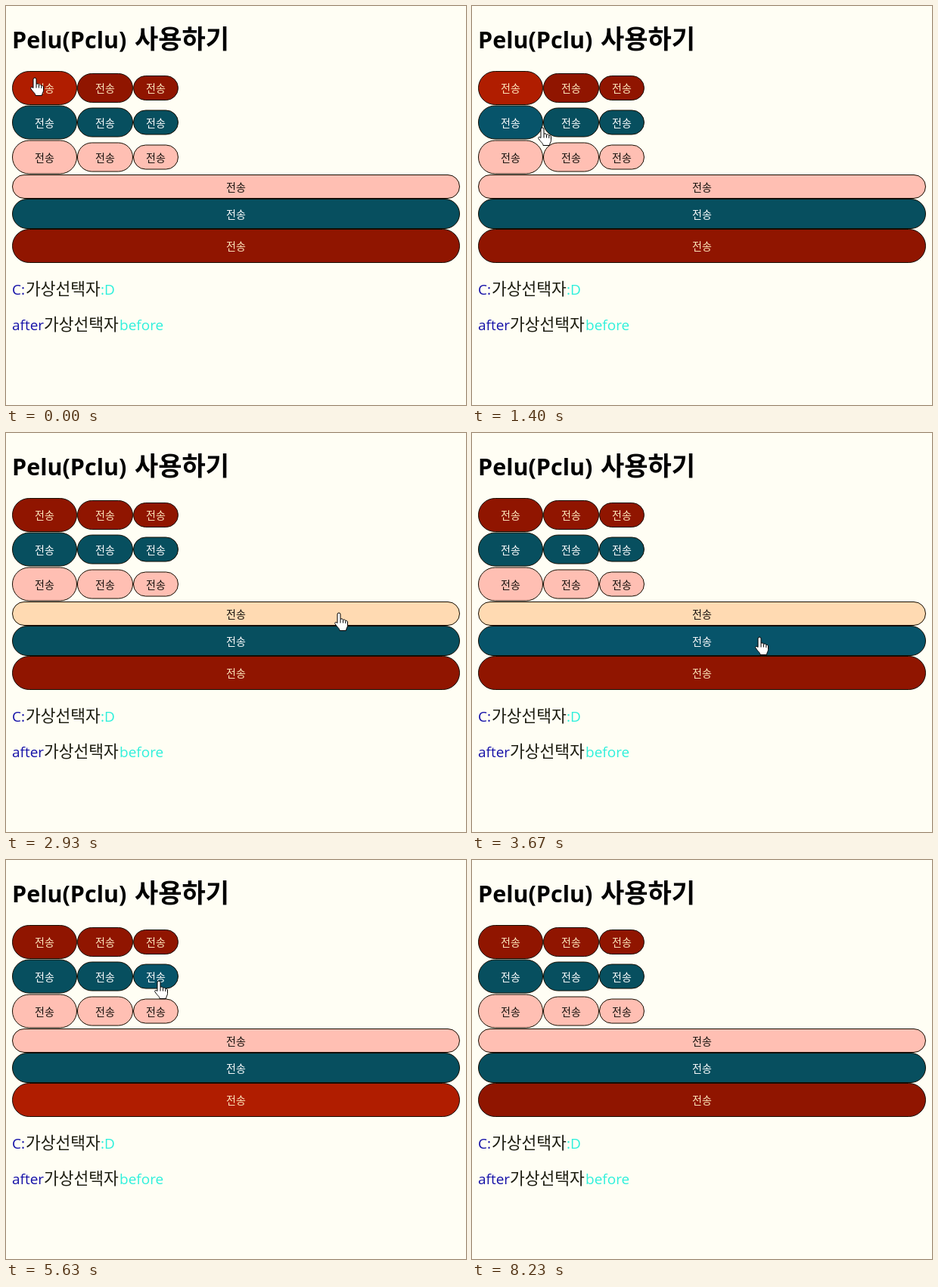
An HTML page that plays this animation: 608 by 528 pixels, repeating every 8.83 s.

```html
<!DOCTYPE html>
<html lang="ko">
<head>
<meta charset="utf-8">
<style>
  html, body { margin: 0; width: 100%; height: 100%; overflow: hidden; background: #fffef4; }
  svg { display: block; width: 608px; height: 528px; }
  text { font-family: "Open Sans", "Noto Sans CJK KR", "Noto Sans CJK", sans-serif; }
  .label { font-size: 14px; text-anchor: middle; }
  .title { font-weight: 700; fill: #000; }
  .latin { font-size: 19px; }
  .hangul { font-size: 21.5px; fill: #1c1c10; }
  .pre { fill: #1410a8; }
  .post { fill: #2ff0dc; }
</style>
</head>
<body>
<svg viewBox="0 0 608 528">
  <rect width="608" height="528" fill="#fffef4"/>
  <text class="title" x="8" y="56" font-size="30.5">Pelu(Pclu)</text>
  <text class="title" x="170" y="56" font-size="34">사용하기</text>
  <g id="buttons"></g>
  <text class="latin pre" x="8" y="382">C:</text>
  <text class="hangul" x="26" y="382">가상선택자</text>
  <text class="latin post" x="125" y="382">:D</text>
  <text class="latin pre" x="8" y="429">after</text>
  <text class="hangul" x="50" y="429">가상선택자</text>
  <text class="latin post" x="150" y="429">before</text>

  <g id="dialog">
    <rect x="78" y="-30" width="452" height="158" rx="3" fill="#000" opacity=".22"/>
    <rect x="80" y="-30" width="448" height="156" rx="2" fill="#2b2911"/>
    <text x="96" y="28" font-size="15.5" fill="#f4f4ea">localhost:3000 내용:</text>
    <text x="96" y="56" font-size="14" fill="#f0f0e2">버튼이 클릭되었습니다.</text>
    <rect x="448" y="78" width="64" height="31" rx="4" fill="#8fb3dc" stroke="#4a7cc0" stroke-width="2"/>
    <rect x="450" y="80" width="60" height="27" rx="3" fill="none" stroke="#1d2a3c"/>
    <text class="label" x="480" y="98" font-size="13" fill="#1c2838">확인</text>
  </g>

  <g id="cursor" fill="#fff" stroke="#000" stroke-linejoin="round">
    <path id="arrow" d="M0 0V16L4 12.5L6.6 19L9.5 17.8L6.8 11.6H12Z"/>
    <path id="hand" transform="translate(-6 -.5)" d="M4 14V2.5a2 2 0 0 1 4 0V9a2 2 0 0 1 3.5 1a2 2 0 0 1 3.3 1a1.8 1.8 0 0 1 2.7 1.5V17c0 3-2 4-2 7H7c0-3-3-4-6-9c-1-2 1-3 3-1zM8 9v5M11.5 10v4M14.8 11v3.5"/>
  </g>
</svg>
<script>
const LOOP = 8830;
const byId = id => document.getElementById(id);

const themes = {
  red:  { base: '#901500', lit: '#b01d00', pressed: '#8c1000', ink: '#ffe9bd' },
  teal: { base: '#074f5f', lit: '#07546a', pressed: '#07546a', ink: '#ffffff' },
  pink: { base: '#ffbfb3', lit: '#ffdab2', pressed: '#ffbfb3', ink: '#15100c' }
};

function addNode(parent, tag, attrs) {
  const node = document.createElementNS('http://www.w3.org/2000/svg', tag);
  for (const key in attrs) node.setAttribute(key, attrs[key]);
  return parent.appendChild(node);
}

function makeButton(theme, x, w, middle, h) {
  const y = middle - h / 2;
  const shape = addNode(byId('buttons'), 'rect', {
    x: x + .5, y: y + .5, width: w - 1, height: h - 1, rx: (h - 1) / 2, stroke: '#140c00'
  });
  const label = addNode(byId('buttons'), 'text', {
    class: 'label', x: x + w / 2, y: middle + 5.5, fill: themes[theme].ink
  });
  label.textContent = '전송';
  return { theme, x, y, w, h, shape };
}

const rows = [['red', 108.5], ['teal', 154], ['pink', 200]];
const sizes = [[8, 86, 45], [94, 74, 39], [168, 60, 33]];
const buttons = rows.flatMap(([theme, middle]) =>
  sizes.map(([x, w, h]) => makeButton(theme, x, w, middle, h)));
const wide = {
  pink: makeButton('pink', 8, 592, 239, 32),
  teal: makeButton('teal', 8, 592, 275, 40),
  red: makeButton('red', 8, 592, 317.5, 45)
};
buttons.push(...Object.values(wide));

// Each dialog: opening time, closing time, button that opened it.
const dialogs = [
  [250, 1050, buttons[0]],
  [1650, 2450, null],
  [2950, 3420, wide.pink],
  [4600, 5220, wide.red]
];
const focusSpans = [
  [150, 2880, buttons[0]],
  [2880, 4520, wide.pink],
  [4520, 6000, wide.red]
];

// Pointer tip: time, x, y.
const path = [
  [0, 38, 95], [220, 40, 97], [700, 488, 95], [1060, 490, 97],
  [1400, 93, 161], [1500, 84, 154], [1620, 84, 154], [2050, 500, 97],
  [2370, 511, 100], [2460, 511, 100], [2820, 440, 236], [2960, 440, 238],
  [3250, 485, 95], [3430, 485, 97], [3670, 380, 270], [4050, 384, 290],
  [4400, 405, 315], [4570, 410, 312], [4670, 439, 250], [4900, 483, 96],
  [5230, 485, 98], [5630, 202, 160], [6000, 198, 108], [6300, 190, 104],
  [6650, 133, 104], [6900, 140, 150], [7200, 196, 190], [7650, 196, 190],
  [8100, 468, 206], [8230, 608, 188]
];

const clamp = v => Math.max(0, Math.min(1, v));

function pointerAt(t) {
  const i = path.findIndex(p => p[0] > t);
  if (i < 0) return null;
  const [t0, x0, y0] = path[i - 1], [t1, x1, y1] = path[i];
  const u = (t - t0) / (t1 - t0), e = u * u * (3 - 2 * u);
  return { x: x0 + (x1 - x0) * e, y: y0 + (y1 - y0) * e };
}

const inside = (b, p) => p && p.x >= b.x && p.x <= b.x + b.w && p.y >= b.y && p.y <= b.y + b.h;

function render(t) {
  const pointer = pointerAt(t);
  const modal = dialogs.find(([open, close]) => t >= open && t < close + 120);
  const alpha = modal ? Math.min(clamp((t - modal[0]) / 200), clamp((modal[1] + 120 - t) / 120)) : 0;
  const focus = focusSpans.find(([from, to]) => t >= from && t < to);

  for (const b of buttons) {
    const theme = themes[b.theme];
    const pressed = modal && modal[2] === b;
    const lit = (focus && focus[2] === b) || (!modal && inside(b, pointer));
    b.shape.setAttribute('fill', pressed ? theme.pressed : lit ? theme.lit : theme.base);
  }

  const away = 1 - alpha;
  byId('dialog').setAttribute('opacity', alpha);
  byId('dialog').setAttribute('transform',
    `translate(304 ${-20 * away}) scale(${1 + .013 * away}) translate(-304 0)`);

  byId('cursor').style.display = pointer ? '' : 'none';
  if (!pointer) return;
  const overDialog = modal && pointer.y < 126 && pointer.x > 80;
  const isHand = !overDialog && buttons.some(b => inside(b, pointer));
  byId('hand').style.display = isHand ? '' : 'none';
  byId('arrow').style.display = isHand ? 'none' : '';
  byId('cursor').setAttribute('transform', `translate(${Math.round(pointer.x)} ${Math.round(pointer.y)})`);
}

const start = performance.now();
function tick() {
  render((performance.now() - start) % LOOP);
  requestAnimationFrame(tick);
}
tick();
</script>
</body>
</html>
```
